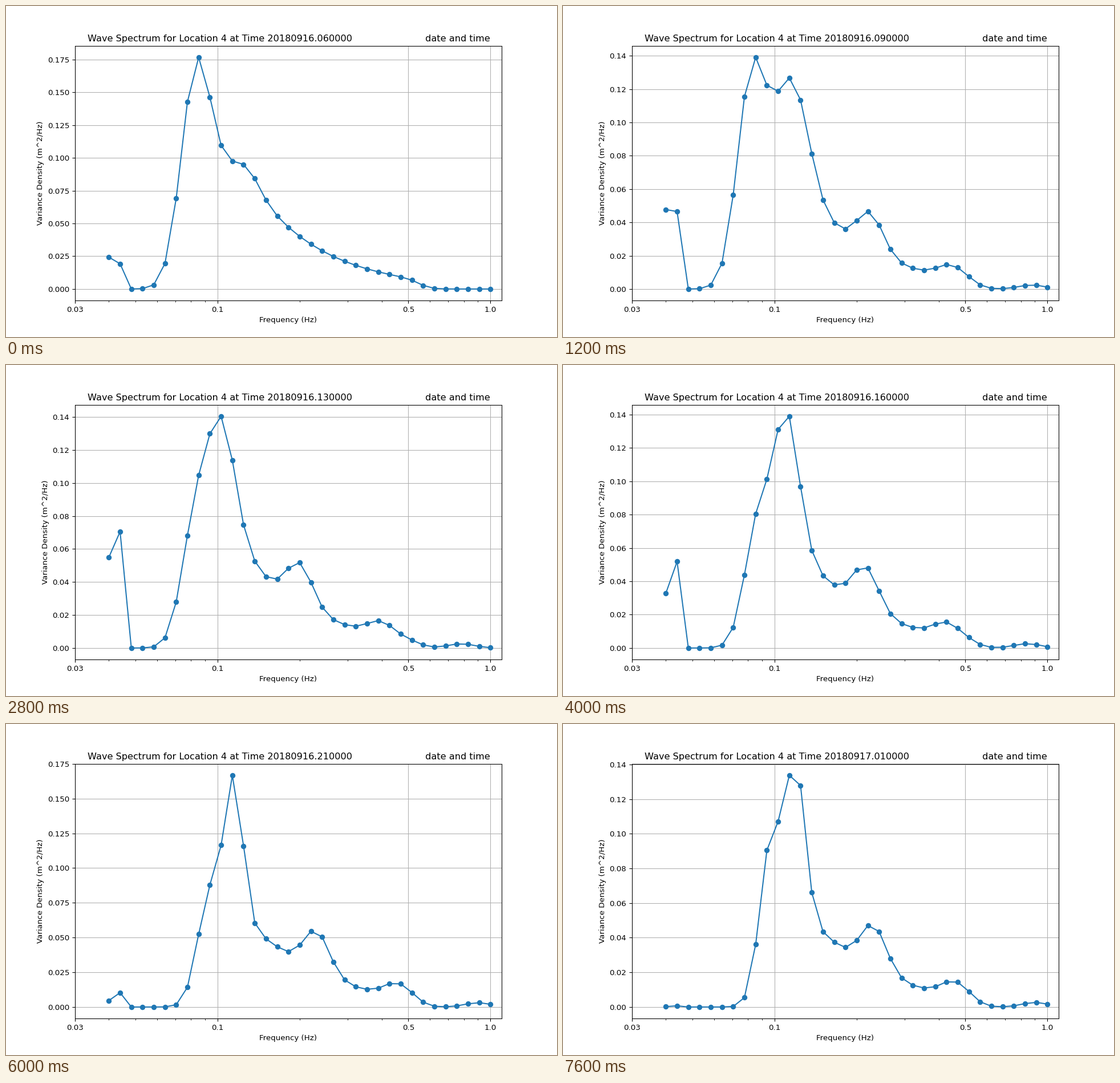
These frames come from a looping animation (966 px wide and 580 px high, 8000 ms). A matplotlib script:

```python
import numpy as np
import matplotlib.pyplot as plt
from matplotlib.animation import FuncAnimation
from matplotlib.ticker import NullFormatter

FIRST_HOUR, HOURS, STEP_MS = 6, 20, 400
KEY_HOURS = (6, 8, 11, 13, 16, 21, 25)
bins = np.arange(35)
freqs = np.geomspace(0.04, 1.0, bins.size)


def track(hour, *values):
    """Interpolate a parameter given at the key hours."""
    return np.interp(hour, KEY_HOURS, values)


def bump(x, height, center, width):
    return height * np.exp(-0.5 * ((x - center) / width) ** 2)


def step(x, center, slope):
    return 1 / (1 + np.exp(-slope * (x - center)))


def peak_density(hour):
    return np.interp(hour, (6, 7, 8, 11, 13, 16, 19, 21, 22, 25),
                     (0.1767, 0.166, 0.1408, 0.1356, 0.1404,
                      0.1389, 0.1655, 0.1668, 0.1645, 0.1337))


def spectrum(hour):
    # An older wave system fades while a younger one grows beside it
    old = bump(bins, track(hour, 400, 385, 260, 195, 200, 185, 255),
               track(hour, 7.8, 7.7, 7.6, 7.7, 8.2, 9.0, 9.4),
               np.interp(hour, (6, 25), (1.35, 1.0)))
    young = bump(bins, track(hour, 165, 270, 335, 345, 345, 320, 300),
                 track(hour, 10.8, 11.2, 10.35, 10.1, 10.7, 11.1, 11.5),
                 np.interp(hour, (11, 21), (1.45, 0.85)))

    # Decaying background between a soft onset and a sharp cutoff
    tail = (np.interp(hour, (6, 8), (155, 118)) * np.exp(-0.16 * (bins - 14))
            * step(bins, 12, 1.5) * step(bins, 27.8, -2))

    # Evenly spaced, ever weaker harmonics
    first = track(hour, 20, 18.6, 17.4, 17, 17.8, 18.5, 18.5)
    height = np.interp(hour, (6, 8, 11), (0, 60, 70))
    harmonics = sum(bump(bins, height * 0.32 ** n, first + 7.2 * n, 1.15)
                    for n in range(3))

    levels = old + young + tail + harmonics
    # Long swell fills only the two lowest bins
    for i in range(2):
        levels[i] += bump(hour, 160 + 35 * i, 11.7 + 1.1 * i, 4)
    return levels / levels.max() * peak_density(hour)


fig, ax = plt.subplots(figsize=(10, 6.00415), dpi=96.6)
fig.subplots_adjust(left=0.1248, right=0.8998)
line, = ax.plot(freqs, np.zeros_like(freqs), "o-", color="C0")
ax.set_xscale("log")
ax.set_xticks([0.03, 0.1, 0.5, 1.0], labels=["0.03", "0.1", "0.5", "1.0"])
ax.xaxis.set_minor_formatter(NullFormatter())
ax.set_xlim(0.03, 1.1)
ax.set_xlabel("Frequency (Hz)")
ax.set_ylabel("Variance Density (m^2/Hz)")
ax.grid(True)
title = ax.set_title("", x=0.501)


def update(frame):
    hour = FIRST_HOUR + frame
    density = spectrum(hour)
    line.set_ydata(density)
    ax.set_ylim(np.array([-0.05, 1.05]) * density.max())
    stamp = f"201809{16 + hour // 24}.{hour % 24:02d}0000"
    title.set_text(f"Wave Spectrum for Location 4 at Time {stamp}"
                   + " " * 25 + "date and time")
    return line, title


anim = FuncAnimation(fig, update, frames=HOURS, interval=STEP_MS,
                     repeat=True, repeat_delay=0, blit=False)
plt.show()
```
